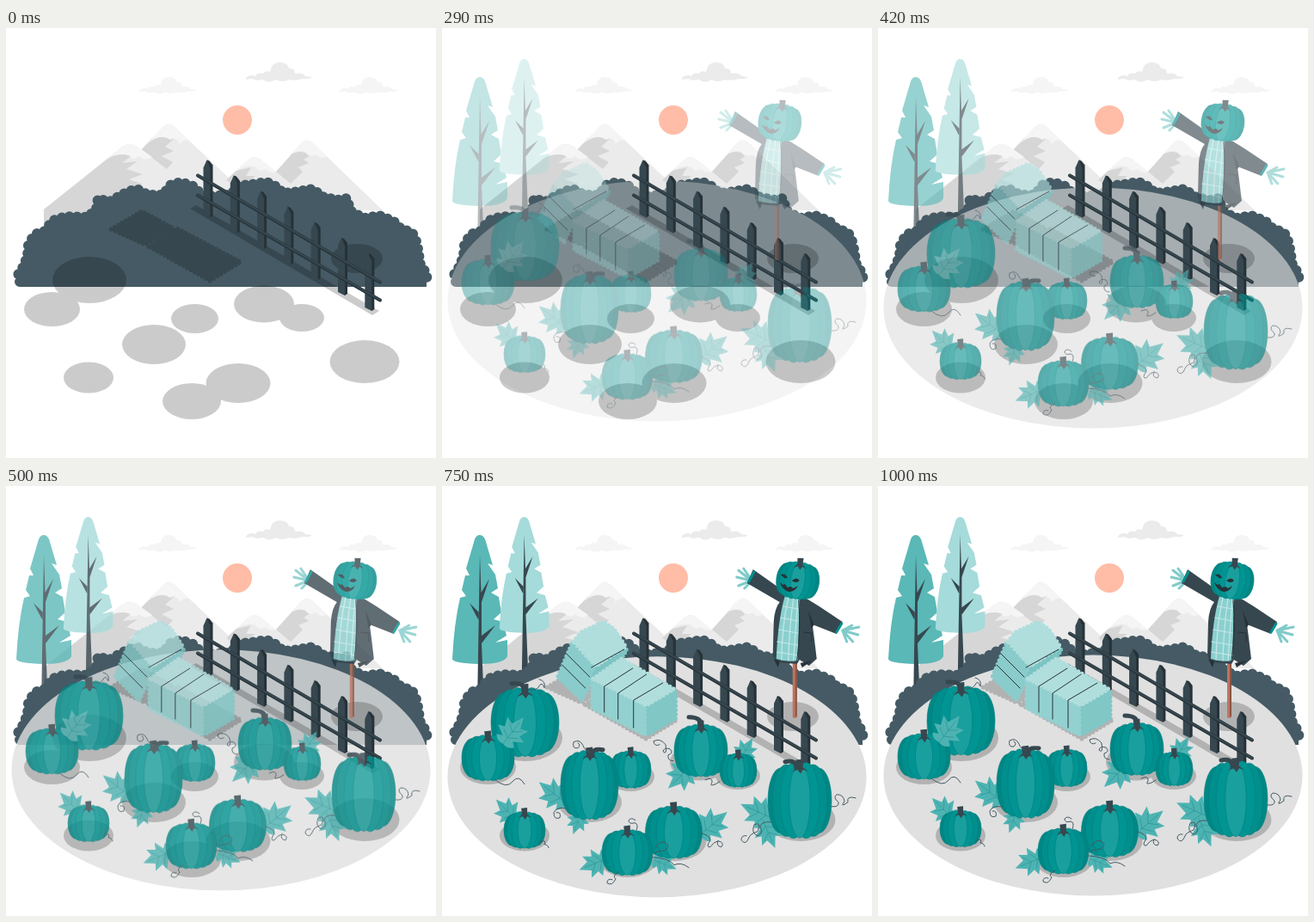
An HTML page that plays this animation: 500 px wide and 500 px high, repeating every 1.04 s.

```html
<!DOCTYPE html>
<html lang="en">
<head>
<meta charset="utf-8">
<title>Pumpkin patch</title>
<style>
  html, body { margin: 0; width: 100%; height: 100%; overflow: hidden; background: #fff; }
  svg { display: block; width: 100vw; height: 100vh; }
  .line { fill: none; stroke-linecap: round; stroke-linejoin: round; }
  .vine { stroke: #455a64; stroke-width: 1; }
  .tuft { stroke-width: 5; stroke-dasharray: 0 5; stroke-linecap: round; }
</style>
</head>
<body>
<svg viewBox="0 0 500 500">
  <defs>
    <path id="cloud" d="M0 18Q5 13 11 16Q13 11 20 13Q22 9 28 11Q30 0 39 0Q49 0 50 7Q57 6 57 13Q66 11 69 16L77 17Q74 20 67 19Q56 22 50 20Q42 24 34 20Q27 25 20 20Q10 22 8 19L0 20Z"/>
    <g id="tree">
      <path d="M44 57Q49 57 51 65L59 92L53 90L62 103L65 119L57 124L66 129L69 147L60 155L71 158L75 174L62 182L76 179V198Q72 207 44 207Q12 206 12 201Q14 160 21 130L28 128L23 121L27 104L32 104L28 96L38 62Q40 57 44 57Z"/>
      <path fill="#37474f" d="M44 80L41 256H49L46 183L62 162L46 174V135L55 108L45.500 124ZM43 157L32 136L43 147Z"/>
    </g>
    <path id="leaf" d="M0 0Q-8 2 -12 -4L-6 -7L-17 -13L-10 -16L-14 -26L-6 -23L0 -36L5 -24L13 -27L9 -17L17 -15L7 -8L12 -4Q7 2 0 0Z"/>
    <path id="stem" fill="#37474f" d="M-9 6L-4 0L-5 -9L4 -10L4 0L10 5L4 3L1 8L-3 3Z"/>
  </defs>

  <use href="#cloud" transform="translate(155 57) scale(.87)" fill="#f5f5f5"/>
  <use href="#cloud" transform="translate(279 40)" fill="#ebebeb"/>
  <use href="#cloud" transform="translate(388 57) scale(.88)" fill="#f5f5f5"/>
  <circle cx="269" cy="107" r="17" fill="#ffbda7"/>

  <g id="mountains">
    <path fill="#ebebeb" d="M157 142L183 115Q189 108 196 115L262 177V215H140ZM255 177L282 153Q289 147 296 153L330 180V200H255ZM314 167L343 134Q350 127 357 134L438 212H360L314 180Z"/>
    <path fill="#d6d6d6" d="M157 142L170 128Q182 122 195 129L185 138L195 143L181 149L194 156L187 164L150 150ZM256 177L268 166L285 162L279 172L290 172L270 185ZM314 167L333 146Q343 141 354 148L346 153L352 157L340 162L345 167L331 181Z"/>
    <path fill="#f5f5f5" d="M165 134L183 115Q189 108 196 115L213 131Q206 129 202 135Q198 125 191 130Q180 122 165 134ZM266 167L282 153Q289 147 296 153L314 167Q306 169 302 164Q295 168 290 162Q280 158 266 167ZM333 146L343 134Q350 127 357 134L373 149Q366 154 361 147Q352 152 348 144Q341 141 333 146Z"/>
    <path fill="#ebebeb" d="M44 211L135 138Q144 131 153 138L187 164L230 215H44Z"/>
    <path fill="#d6d6d6" d="M44 228V211L122 149Q132 143 145 149L135 157L153 155L140 164L159 170L143 176L158 181L100 230Z"/>
    <path fill="#f5f5f5" d="M118 152L135 138Q144 131 153 138L170 150Q162 156 155 149Q148 155 143 148Q130 145 118 152Z"/>
  </g>

  <g id="trees">
    <use href="#tree" fill="#5ab8b7"/>
    <use href="#tree" fill="#a5dbda" transform="translate(56 -15.300) scale(.9)"/>
  </g>

  <path fill="#455a64" stroke="#455a64" stroke-width="12" stroke-dasharray="0 9" stroke-linecap="round" d="M16 295L14 287L21 276L25 264L26 252L33 240L45 236L54 224L70 219L95 220L105 210L107 198L120 202L140 191L152 187L165 194L183 194L190 183L203 179L218 184L230 196L262 194L268 184L290 181L303 179L316 185L322 192L340 190L357 187L368 196L385 200L397 198L400 212L416 221L434 218L450 224L460 234L472 237L478 250L480 263L482 275L490 287L488 295"/>
  <path fill="#455a64" d="M16 292H489V301H16Z"/>

  <ellipse id="ground" cx="250" cy="336.500" rx="243.500" ry="140" fill="#e0e0e0"/>
  <g id="shadows" opacity=".2">
    <path d="M214 210L221 206L434 329L426 334Z"/>
    <path class="tuft" stroke="#000" d="M122 234L158 213L195 233L162 252ZM166 254L199 233L273 272L237 294Z"/>
  </g>
  <g id="fence"></g>

  <g id="sliding">
    <g id="hay"></g>
    <path class="line" stroke="#263238" d="M187 263V233L220 212M203 271V241L236 219M221 281V249L255 229M143 195L170 222M138 208L165 235M172 211L210 190"/>

    <path fill="#b97662" d="M406 198H411V269Q408 271 406 269Z"/>
    <path fill="#8d5443" d="M409 204H411V268H409Z"/>
    <g class="line" stroke="#80cbc9" stroke-width="3">
      <path d="M358 110L343 98M358 110L341 106M358 110L343 116M358 109L349 96M357 112L350 119M464 168L483 164M464 168L482 173M464 168L476 181M464 168L475 162M464 168L469 181"/>
    </g>
    <path fill="#37474f" d="M360 97L394 121L424 132L437 140L464 158L457 172L429 161L431 176L434 201L425 209L414 202L411 207L388 205L383 198L384 158Q385 142 391 135L353 113Z"/>
    <path fill="#263238" d="M424 145L431 161L428 166ZM415 206L429 203L417 211ZM384 201L391 204L389 211Z"/>
    <path fill="#8ad0cf" d="M397 128L414 130L412 203Q399 205 387 201Q389 155 397 128Z"/>
    <path class="line" stroke="#c5e7e6" stroke-width="1.200" d="M401 130Q394 160 393 202M407 130Q402 165 401 203M412 131L407 203M395 140L413 143M392 153L412 157M390 167L412 171M388 181L412 185M388 193L412 197"/>
    <path class="line" stroke="#263238" d="M413 133Q416 165 411 204M419 170L428 171V181"/>
    <path class="line" stroke="#00908e" stroke-width="3" d="M361 100L355 111M463 160L457 170"/>
    <g id="head" transform="rotate(8 412 110)"></g>
    <path fill="#263238" d="M392 103Q398 101 400 107Q396 108 392 103ZM405 110Q411 105 414 110Q410 114 405 110ZM391 112L395 115L397 114L400 118L404 117L407 119L412 116Q409 123 402 123Q394 121 391 112Z"/>
  </g>

  <g id="patch">
    <g id="leaves"></g>
    <g id="pumpkins"></g>
    <path class="line" stroke="#37474f" stroke-width="5" d="M96 236Q95 226 81 228M175 312Q173 303 187 305M302 279Q303 267 287 267M412 326Q412 316 399 319"/>
    <g id="topLeaves"></g>
    <path class="line vine" d="M62 340Q75 351 82 342T96 345M101 235Q110 237 113 231T119 233Q121 225 113 223M144 373Q133 371 130 378Q130 387 137 384Q139 377 133 378M172 308Q166 306 164 300Q160 292 153 296Q151 304 158 303Q162 299 158 297M269 318Q262 318 263 311Q270 309 265 304Q258 302 257 307Q262 312 260 299Q254 291 246 295Q247 302 253 299M306 340Q315 336 314 343Q310 348 318 345L323 342M453 371Q462 372 461 366Q454 360 459 357Q467 357 468 365Q462 373 472 366Q470 358 481 361M382 389Q372 388 370 394Q374 402 367 405Q359 402 363 392Q372 388 367 400Q358 403 357 407Q353 417 348 410Q348 404 354 405M114 412Q122 409 119 415Q123 415 124 419M226 399Q229 391 224 390Q217 392 217 387Q220 383 225 387M248 419Q253 410 260 413Q266 418 259 422L248 424M301 402Q311 404 312 410Q306 419 312 418Q316 412 321 411Q329 413 325 418Q318 417 321 411M206 447Q197 452 202 455Q198 464 192 460Q192 454 198 456M245 430Q264 431 270 439Q278 435 287 442"/>
  </g>
</svg>
<script>
const $ = id => document.getElementById(id);
const add = (id, html) => $(id).insertAdjacentHTML('beforeend', html);
const ellipse = (cx, cy, rx, ry, attrs = '') =>
  `<ellipse cx="${cx}" cy="${cy}" rx="${rx}" ry="${ry}" ${attrs}/>`;

// Cast shadows
[[97, 293, 43, 27], [53.5, 327, 32.5, 20], [219.5, 338, 27.5, 17], [172, 368, 37, 23],
 [96, 406.5, 29, 18], [216, 434, 34, 21], [270, 413, 37.5, 23], [300, 321, 35, 21.5],
 [344, 337, 26, 16], [417, 388, 40.5, 25], [408, 268, 30, 17]
].forEach(e => add('shadows', ellipse(...e)));

// Fence
for (let i = 0; i < 7; i++) {
  add('fence', `<g transform="translate(${229.5 + 31.3 * i} ${153.5 + 18.1 * i})">
    <path fill="#263238" d="M4 0L7 1L11 6V65L8 67L4 60Z"/>
    <path fill="#37474f" d="M0 9L4 0L8 9V67L0 63Z"/></g>`);
}
for (const [y, end] of [[171, 295], [194, 316]]) {
  add('fence', `<path class="line" stroke="#263238" stroke-width="4" d="M223 ${y + .5}L435 ${end + .5}"/>
    <path class="line" stroke="#37474f" stroke-width="2.500" d="M223 ${y}L435 ${end}"/>`);
}

// Hay bales, face by face
[['#8acccb', 'M149 184L177 211L170 230L161 249L133 222Z'],
 ['#7cc4c3', 'M179 212L213 190L206 203L172 226Z'],
 ['#b0dedd', 'M151 181L160 170L186 158L198 166L212 187L177 209Z'],
 ['#80c7c6', 'M237 256L270 238V270L237 289Z'],
 ['#93d1d0', 'M173 226L234 257V289L173 258Z'],
 ['#b0dedd', 'M174 224L207 201L268 236L236 255Z']
].forEach(([color, d]) => add('hay', `<path class="tuft" fill="${color}" stroke="${color}" d="${d}"/>`));

// Ribs run from the dark sides to the light middle
function pumpkin(id, cx, cy, rx, ry) {
  const line = 'stroke="#007f7d" stroke-width=".6"';
  const ribs = [[.6, .4, .84, '#008785'], [.42, .44, .93, '#008f8d'],
                [.2, .42, .98, '#009492'], [0, .33, .97, '#199f9d']];
  for (const [offset, w, h, color] of ribs)
    for (const side of offset ? [-1, 1] : [1])
      add(id, ellipse(cx + side * offset * rx, cy, w * rx, h * ry, `fill="${color}" ${line}`));
  add(id, `<use href="#stem" transform="translate(${cx} ${cy - ry * .86}) scale(${.45 + rx / 75})"/>`);
}
[[96.5, 273, 39.5, 41], [53.5, 314.5, 30.5, 27], [219.5, 328, 23.5, 22], [171.5, 346, 33.5, 41],
 [301, 306, 31, 31], [344.5, 329, 21.5, 20], [416, 364, 37, 45], [96, 398.5, 24, 21.5],
 [269.5, 401, 33, 31], [215.5, 424.5, 29.5, 27]
].forEach(p => pumpkin('pumpkins', ...p));
pumpkin('head', 412, 110, 25, 22);

// x, y, angle, scale
const leaf = (id, color, x, y, angle, scale) => add(id,
  `<g transform="translate(${x} ${y}) rotate(${angle}) scale(${scale})">
    <use href="#leaf" fill="${color}"/><path class="line" stroke="#2f9a99" stroke-width=".7" d="M0 0V-29M0 -8L-9 -13M0 -8L9 -14M0 -16L-8 -22M0 -16L8 -23"/></g>`);
[[144, 367, -52, 1.1], [162, 377, 200, .78], [291, 322, 225, 1.1], [346, 318, 30, .85],
 [385, 385, -66, 1.15], [373, 387, 156, .98], [87, 387, -45, .95], [300, 404, 50, 1.15],
 [193, 431, 248, 1], [246, 433, 112, .8]
].forEach(l => leaf('leaves', '#4db3b2', ...l));
leaf('topLeaves', '#4db3b2', 71, 298, 38, 1.08);

// Cubic bezier (.36, -.01, .5, 1.38), which overshoots before settling
const bezier = (a, b, s) => 3 * (1 - s) * s * ((1 - s) * a + s * b) + s ** 3;
function ease(t) {
  let lo = 0, hi = 1;
  for (let i = 0; i < 30; i++) {
    const mid = (lo + hi) / 2;
    if (bezier(.36, .5, mid) < t) lo = mid; else hi = mid;
  }
  return bezier(-.01, 1.38, lo);
}

const LOOP = 1040, FPS = 24, LEAD = .027;
const start = performance.now();

function draw() {
  const ms = (performance.now() - start) % LOOP;
  const step = Math.floor(ms * FPS / 1000 + .1);
  const p = step < 2 ? 0 : ease(Math.min(1, step / FPS + LEAD));
  const shift = 30 * (p - 1);
  for (const [id, x, y] of [['trees', 0, 0], ['ground', 0, shift], ['sliding', shift, 0], ['patch', 0, shift]]) {
    $(id).setAttribute('opacity', Math.max(0, Math.min(1, p)));
    $(id).setAttribute('transform', `translate(${x} ${y})`);
  }
  requestAnimationFrame(draw);
}
draw();
</script>
</body>
</html>
```
